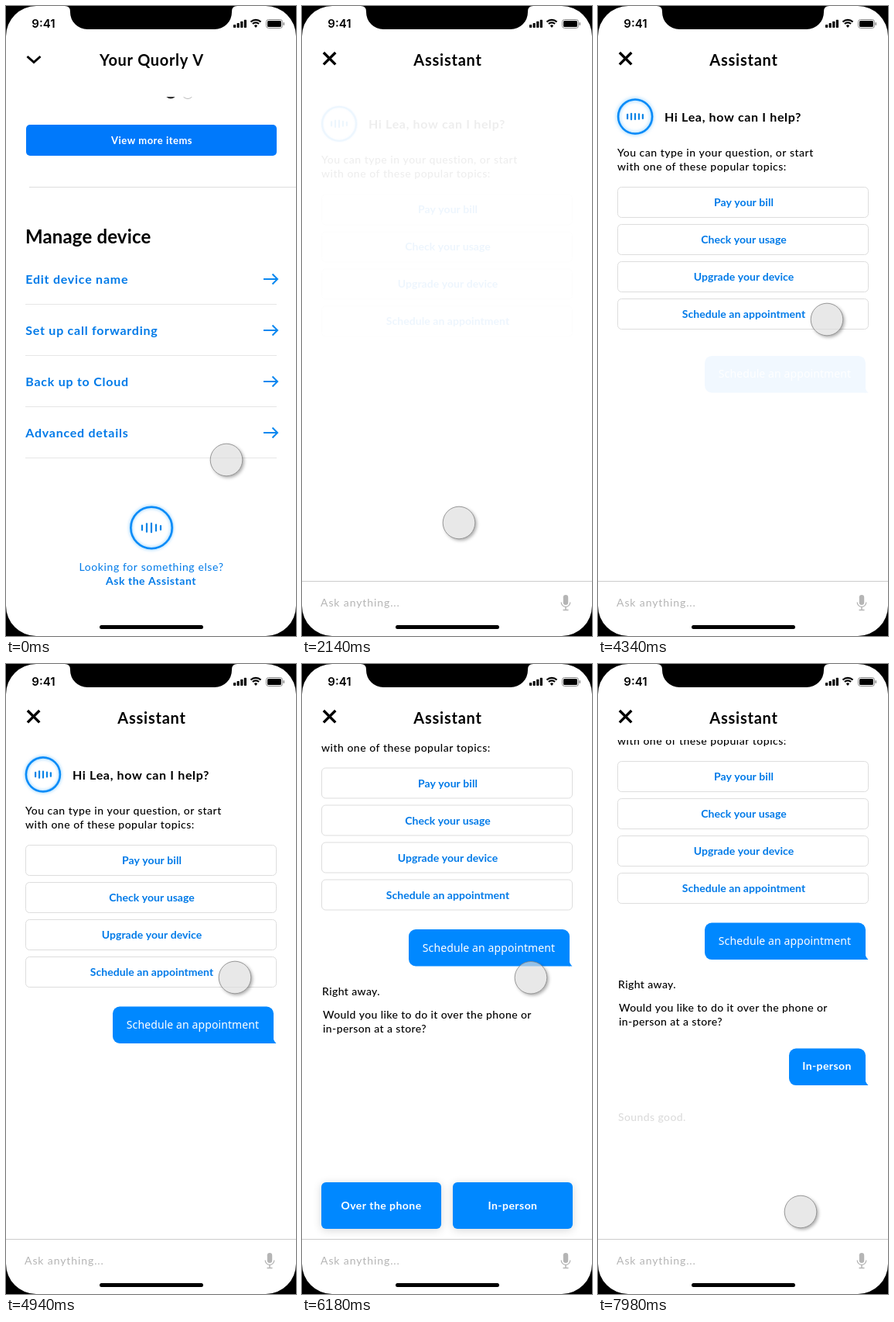
An HTML page with a canvas that plays this animation: 375x812 px, repeating every 8 s.

```html
<!DOCTYPE html>
<html lang="en">
<head>
<meta charset="utf-8">
<title>Assistant</title>
<style>
html, body { margin: 0; width: 100%; height: 100%; overflow: hidden; background: #000; }
canvas { display: block; width: 375px; height: 812px; }
</style>
</head>
<body>
<canvas id="stage"></canvas>
<script>
const W = 375, H = 812, LOOP = 8000;
const BLUE = '#0088ff', LINK = '#007ae8', BLACK = '#000', WHITE = '#fff';
const ratio = window.devicePixelRatio || 1;

function surface(canvas) {
  canvas.width = W * ratio;
  canvas.height = H * ratio;
  return canvas.getContext('2d');
}

const layer = surface(document.createElement('canvas'));
let ctx = surface(document.getElementById('stage'));

const clamp = v => Math.max(0, Math.min(1, v));
const mix = (a, b, p) => a + (b - a) * p;
const ease = v => v < .5 ? 2 * v * v : 1 - 2 * (1 - v) * (1 - v);
const progress = (t, start, duration = 560) => ease(clamp((t - start) / duration));

function scoped(draw) {
  ctx.save();
  draw();
  ctx.restore();
}

function text(str, x, y, { size = 14, weight = 400, color = BLACK, space = .5, align = 'left', family = 'Lato, sans-serif' } = {}) {
  ctx.font = `${weight} ${size}px ${family}`;
  ctx.letterSpacing = space + 'px';
  ctx.textAlign = align;
  ctx.fillStyle = color;
  ctx.fillText(str, x, y);
}

function box(x, y, w, h, r, fill) {
  ctx.beginPath();
  ctx.roundRect(x, y, w, h, r);
  if (fill) {
    ctx.fillStyle = fill;
    ctx.fill();
  }
}

function stroke(color, width, ...points) {
  ctx.beginPath();
  points.forEach(([x, y], i) => i ? ctx.lineTo(x, y) : ctx.moveTo(x, y));
  ctx.strokeStyle = color;
  ctx.lineWidth = width;
  ctx.stroke();
}

function ring(x, y, r, color, width) {
  ctx.beginPath();
  ctx.arc(x, y, r, 0, 7);
  ctx.strokeStyle = color;
  ctx.lineWidth = width;
  ctx.stroke();
}

function clipBelow(top, draw) {
  scoped(() => {
    ctx.beginPath();
    ctx.rect(0, top, W, H - top);
    ctx.clip();
    draw();
  });
}

// Draws a group on its own layer so that overlapping parts fade as one.
function faded(alpha, draw) {
  if (alpha <= 0) return;
  if (alpha >= 1) return scoped(draw);
  const under = ctx;
  layer.resetTransform();
  layer.clearRect(0, 0, W * ratio, H * ratio);
  layer.setTransform(under.getTransform());
  ctx = layer;
  draw();
  ctx = under;
  scoped(() => {
    ctx.resetTransform();
    ctx.globalAlpha = alpha;
    ctx.drawImage(layer.canvas, 0, 0);
  });
}

function appear(p, draw) {
  faded(p, () => {
    ctx.translate(0, 10 * (1 - p));
    draw();
  });
}

function statusBar() {
  text('9:41', 33.3, 28, { size: 15, weight: 600, space: 0, family: 'Inter, sans-serif' });
  for (let i = 0; i < 4; i++) {
    const h = 4 + i * 2.1;
    box(294 + i * 4.6, 28 - h, 3.2, h, .8, BLACK);
  }
  const fan = -Math.PI / 4;
  for (const r of [9.2, 5.7]) {
    ctx.beginPath();
    ctx.arc(323, 27, r, 3 * fan, fan);
    ctx.strokeStyle = BLACK;
    ctx.lineWidth = 2.2;
    ctx.stroke();
  }
  ctx.beginPath();
  ctx.moveTo(323, 28);
  ctx.arc(323, 27.5, 3, 3 * fan, fan);
  ctx.fillStyle = BLACK;
  ctx.fill();
  box(336.5, 17.5, 21, 11, 3);
  ctx.strokeStyle = '#888';
  ctx.lineWidth = 1;
  ctx.stroke();
  box(338, 19, 18, 8, 1.6, BLACK);
  box(358.6, 21, 1.4, 4, 1, '#888');
}

// Everything outside the phone's display area.
function bezel() {
  ctx.fillStyle = BLACK;
  ctx.beginPath();
  ctx.rect(0, 0, W, H);
  ctx.roundRect(0, 0, W, H, 39);
  ctx.fill('evenodd');
  ctx.beginPath();
  ctx.moveTo(76, 0);
  ctx.quadraticCurveTo(83, 0, 83, 7);
  ctx.arcTo(83, 30, 105, 30, 22);
  ctx.arcTo(292, 30, 292, 8, 22);
  ctx.lineTo(292, 7);
  ctx.quadraticCurveTo(292, 0, 299, 0);
  ctx.fill();
  box(121, 798, 134, 5, 2.5, BLACK);
}

function voiceIcon(x, y, r, t) {
  const beat = Math.sin(t / 130);
  scoped(() => {
    ctx.shadowColor = 'rgba(0,150,255,.6)';
    ctx.shadowBlur = 4 + beat;
    ring(x, y, r, '#0a8cf5', 2.4);
  });
  ring(x + .8 * Math.cos(t / 170), y + .8 * Math.sin(t / 170), r, 'rgba(0,136,255,.4)', 2);
  const gap = r * .225;
  [7.5, 10.5, 12, 10.5, 7.5].forEach((h, i) => {
    const tall = h * r / 25 * (1 + .14 * Math.sin(t / 110 + i * 1.3));
    box(x + (i - 2) * gap - 1.1, y - tall / 2, 2.2, tall, 1, '#0a84e6');
  });
}

function arrow(y) {
  stroke('#0a88f0', 2, [333, y], [351, y]);
  stroke('#0a88f0', 2, [344.5, y - 6.5], [351, y], [344.5, y + 6.5]);
}

function devicePage(t) {
  stroke(BLACK, 3, [27.5, 65], [36, 72.5], [44.5, 65]);
  text('Your Quorly V', 188.5, 77, { size: 20, weight: 700, space: .65, align: 'center' });
  clipBelow(117, () => {
    ctx.beginPath();
    ctx.arc(213, 112, 7.5, 0, 7);
    ctx.fillStyle = '#333';
    ctx.fill();
    ring(235, 112, 7.5, '#bbb', 1);
  });
  box(26, 153, 324, 40, 5, '#0079fb');
  text('View more items', 188.5, 178, { size: 13, weight: 700, color: WHITE, align: 'center' });
  stroke('#ddd', 1, [30, 233.5], [W, 233.5]);
  text('Manage device', 25, 306, { size: 24, weight: 700, space: .15 });
  ['Edit device name', 'Set up call forwarding', 'Back up to Cloud', 'Advanced details'].forEach((label, i) => {
    const y = 352 + i * 66;
    text(label, 25.3, y + 5.5, { size: 16, weight: 700, space: .75, color: LINK });
    arrow(y);
    stroke('#e6e6e6', 1, [25, y + 32.5], [350, y + 32.5]);
  });
  voiceIcon(188, 672.5, 26.7, Math.min(t, 1060));
  text('Looking for something else?', 188, 728, { color: LINK, space: .6, align: 'center' });
  text('Ask the Assistant', 187.5, 746, { weight: 700, color: LINK, space: .55, align: 'center' });
}

function bubble(x, y, w, h) {
  const right = x + w;
  box(x, y, w, h, [9, 9, 0, 9], BLUE);
  ctx.beginPath();
  ctx.moveTo(right - 1, y + h - 9);
  ctx.quadraticCurveTo(right, y + h - 3, right + 3.5, y + h);
  ctx.lineTo(right - 1, y + h);
  ctx.fill();
}

function greeting(t) {
  voiceIcon(48, 142.5, 22, t);
  text('Hi Lea, how can I help?', 86, 149, { size: 16, weight: 700, space: .65 });
  text('You can type in your question, or start', 25, 194, { weight: 500 });
  text('with one of these popular topics:', 25, 212, { weight: 500 });
  ['Pay your bill', 'Check your usage', 'Upgrade your device', 'Schedule an appointment'].forEach((label, i) => {
    const y = 233.5 + i * 48;
    box(25.5, y, 324, 39, 5);
    ctx.strokeStyle = '#ddd';
    ctx.lineWidth = 1;
    ctx.stroke();
    text(label, 188.5, y + 24.5, { weight: 700, space: .05, color: LINK, align: 'center' });
  });
}

function conversation(t) {
  const reply = { weight: 500, space: .4 };
  appear(progress(t, 2040), () => greeting(t));
  appear(progress(t, 4250), () => {
    bubble(138, 441.5, 208, 47.5);
    text('Schedule an appointment', 241.5, 470, { weight: 500, space: .1, color: WHITE, align: 'center', family: '"Noto Sans", sans-serif' });
  });
  appear(progress(t, 4990), () => {
    text('Right away.', 26, 526, reply);
    text('Would you like to do it over the phone or', 27, 556, reply);
    text('in-person at a store?', 27, 574, reply);
  });
  appear(progress(t, 7100), () => {
    bubble(247, 603.5, 99, 47.5);
    text('In-person', 296, 631, { weight: 700, space: .4, color: WHITE, align: 'center' });
  });
  appear(progress(t, 7835), () => text('Sounds good.', 26, 688, reply));
}

function choice(label, x, y, w, h) {
  scoped(() => {
    ctx.shadowColor = 'rgba(0,0,0,.16)';
    ctx.shadowBlur = 12;
    ctx.shadowOffsetY = 2;
    box(x, y, w, h, 6, BLUE);
  });
  text(label, x + w / 2, y + h / 2 + 5, { weight: 700, space: .45, color: WHITE, align: 'center' });
}

function choices(t) {
  const leave = progress(t, 7100);
  faded(progress(t, 4990) * (1 - leave), () => {
    choice('Over the phone', 25, 668, 155, 60);
    choice('In-person', mix(195, 247, leave), mix(668, 504, leave), mix(155, 99, leave), mix(60, 47.5, leave));
  });
}

function inputBar() {
  stroke('#ccc', 1, [0, 741.5], [W, 741.5]);
  text('Ask anything...', 24, 774, { color: '#b5b5b5', space: .9 });
  box(337.8, 759, 6.4, 13, 3.2, '#b5b5b5');
  ctx.beginPath();
  ctx.arc(341, 768.5, 5.8, 0, Math.PI);
  ctx.strokeStyle = '#b5b5b5';
  ctx.lineWidth = 1.3;
  ctx.stroke();
  stroke('#b5b5b5', 1.5, [341, 774], [341, 778.5]);
  stroke('#b5b5b5', 1.5, [337.5, 778.5], [344.5, 778.5]);
}

function assistantPage(t) {
  ctx.fillStyle = WHITE;
  ctx.fillRect(0, 0, W, H);
  statusBar();
  stroke(BLACK, 3.4, [27.9, 60], [43.3, 75.4]);
  stroke(BLACK, 3.4, [43.3, 60], [27.9, 75.4]);
  text('Assistant', 188.5, 77, { size: 20, weight: 700, space: .75, align: 'center' });
  clipBelow(98, () => {
    ctx.translate(0, -99.5 * progress(t, 5000) - 62 * progress(t, 7835));
    conversation(t);
  });
  choices(t);
  inputBar();
}

function curve(a, b, c, u) {
  return a.map((v, i) => (1 - u) * (1 - u) * v + 2 * u * (1 - u) * b[i] + u * u * c[i]);
}

function pointerAt(t) {
  const first = [285, 585], icon = [203, 666], option = [296, 404], button = [262, 706];
  if (t < 2960) return curve(first, [244, 625.5], icon, progress(t, 0, 700));
  if (t < 6170) return curve(icon, [266, 636], option, progress(t, 2960, 600));
  return curve(option, [279, 555], button, progress(t, 6170));
}

function pointer(t) {
  const [x, y] = pointerAt(t);
  const r = 20.8;
  // The shadow is kept outside the translucent disc.
  scoped(() => {
    ctx.beginPath();
    ctx.rect(0, 0, W, H);
    ctx.arc(x, y, r, 0, 7);
    ctx.clip('evenodd');
    ctx.shadowColor = 'rgba(0,0,0,.35)';
    ctx.shadowBlur = 4;
    ctx.shadowOffsetX = 2;
    ctx.shadowOffsetY = 2;
    ctx.beginPath();
    ctx.arc(x, y, r, 0, 7);
    ctx.fillStyle = WHITE;
    ctx.fill();
  });
  ctx.beginPath();
  ctx.arc(x, y, r, 0, 7);
  ctx.fillStyle = 'rgba(221,221,221,.67)';
  ctx.fill();
  ring(x, y, r, 'rgba(130,130,130,.8)', 1);
}

function render(t) {
  ctx.setTransform(ratio, 0, 0, ratio, 0, 0);
  ctx.fillStyle = WHITE;
  ctx.fillRect(0, 0, W, H);
  const slide = progress(t, 1440, 420);
  if (slide < 1) {
    statusBar();
    devicePage(t);
  }
  if (slide > 0) {
    scoped(() => {
      ctx.translate(0, H * (1 - slide));
      assistantPage(t);
    });
  }
  pointer(t);
  bezel();
}

const began = performance.now();
function tick() {
  render((performance.now() - began) % LOOP);
  requestAnimationFrame(tick);
}
tick();
</script>
</body>
</html>
```
